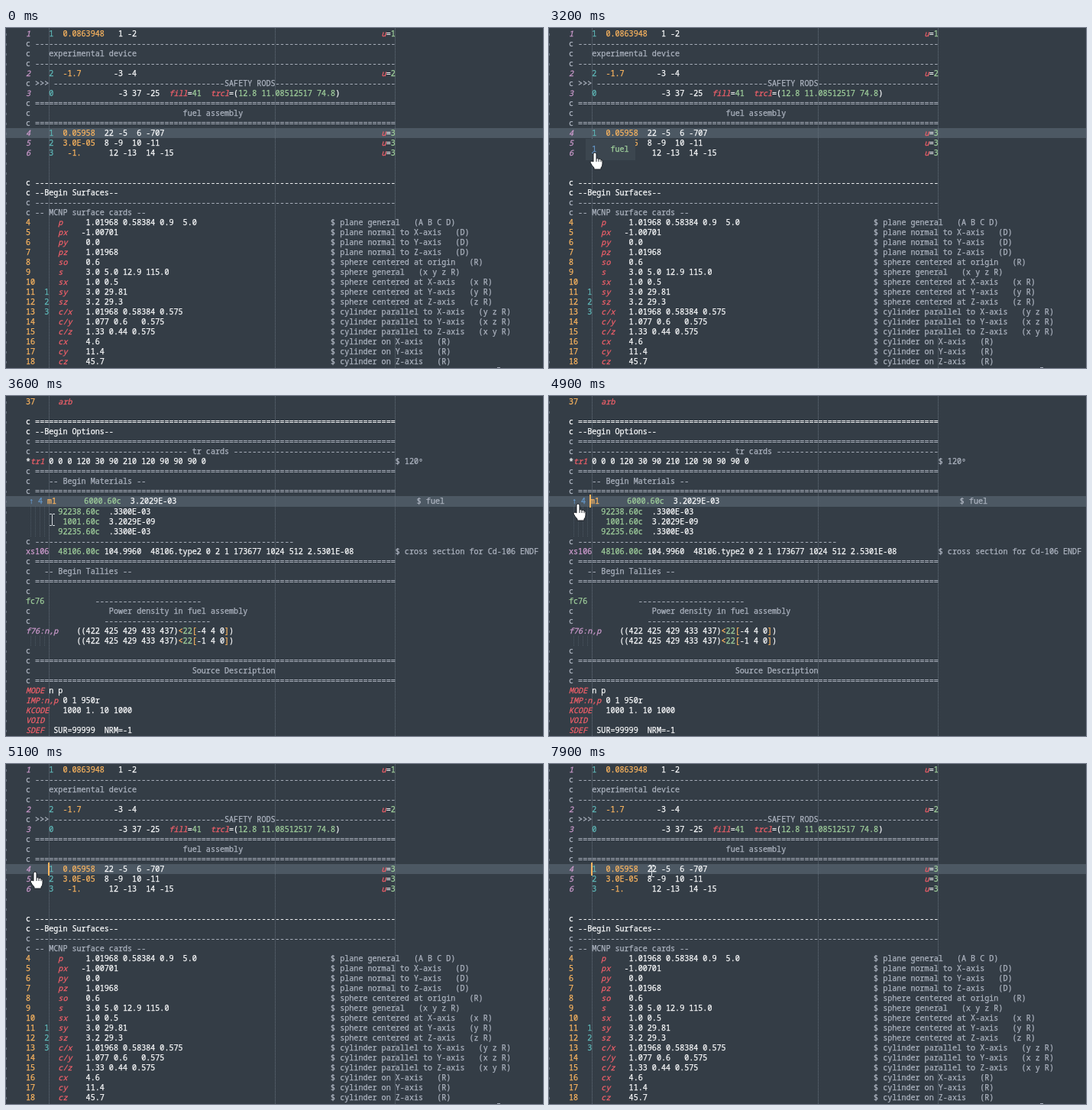
Animation of 703x445 px, one loop 8000 ms. Source, as an HTML page with a canvas:

```html
<!DOCTYPE html>
<html>
<head>
<meta charset="utf-8">
<style>
html, body { margin: 0; width: 100%; height: 100%; overflow: hidden; background: #343d46; }
canvas { display: block; }
</style>
</head>
<body>
<canvas id="stage" width="703" height="445"></canvas>
<script>
const ctx = document.getElementById('stage').getContext('2d');
const CHAR = 6.047, LEFT = 26, ROW = 13, TOP = 1, CURRENT = 10, LOOP = 8000, STEP = 100;
const FONT = '10.08px "Noto Sans Mono", "DejaVu Sans Mono", monospace';
const COLORS = {
  g: '#adb4c0', w: '#fbfcfd', o: '#fbb55f', t: '#5fb8b8', n: '#a0d09c',
  p: '#cf9ccf', r: '#f4606a', b: '#6699cc'
};

const line = (mark, style = 'g') => `0${style}c ${mark.repeat(78)}`;
const dash = line('-'), rule = line('=');
const universe = n => `|77Ru|78w=|79n${n}`;
const surface = (id, kind, values, note = '', ref = '') =>
  `0o${id}|4t${ref}|7R${kind}|${values[0] === '-' ? 12 : 13}w${values}|66g$ ${note}`;
const tally = n => `11w((422 425 429 433 437)|33o<|34n22|36o[|37w${n} 4 0|43o]|44w)`;

// A row is a list of "column, style, text"; an upper-case style is italic.
const cells = [
  '0P1|5t1|8o0.0863948|20w1 -2' + universe(1),
  dash,
  '0gc    experimental device',
  dash,
  '0P2|5t2|8o-1.7|19w-3 -4' + universe(2),
  `0gc >>> ${'-'.repeat(37)}SAFETY RODS${'-'.repeat(26)}`,
  '0P3|5t0|20w-3 37 -25|31Rfill|35w=|36n41|40Rtrcl|44w=(|46n12.8 11.08512517 74.8|67w)',
  rule,
  '0gc|34gfuel assembly',
  rule,
  '0P4|5t1|8o0.05958|17w22 -5  6 -707' + universe(3),
  '0P5|5t2|8o3.0E-05|17w8 -9  10 -11' + universe(3),
  '0P6|5t3|9o-1.|18w12 -13  14 -15' + universe(3),
  '', '',
  line('-', 'w'),
  '0wc --Begin Surfaces--',
  dash,
  '0gc -- MCNP surface cards --',
  surface(4, 'p', '1.01968 0.58384 0.9  5.0', 'plane general   (A B C D)'),
  surface(5, 'px', '-1.00701', 'plane normal to X-axis   (D)'),
  surface(6, 'py', '0.0', 'plane normal to Y-axis   (D)'),
  surface(7, 'pz', '1.01968', 'plane normal to Z-axis   (D)'),
  surface(8, 'so', '0.6', 'sphere centered at origin   (R)'),
  surface(9, 's', '3.0 5.0 12.9 115.0', 'sphere general   (x y z R)'),
  surface(10, 'sx', '1.0 0.5', 'sphere centered at X-axis   (x R)'),
  surface(11, 'sy', '3.0 29.81', 'sphere centered at Y-axis   (y R)', 1),
  surface(12, 'sz', '3.2 29.3', 'sphere centered at Z-axis   (z R)', 2),
  surface(13, 'c/x', '1.01968 0.58384 0.575', 'cylinder parallel to X-axis   (y z R)', 3),
  surface(14, 'c/y', '1.077 0.6   0.575', 'cylinder parallel to Y-axis   (x z R)'),
  surface(15, 'c/z', '1.33 0.44 0.575', 'cylinder parallel to Z-axis   (x y R)'),
  surface(16, 'cx', '4.6', 'cylinder on X-axis   (R)'),
  surface(17, 'cy', '11.4', 'cylinder on Y-axis   (R)'),
  surface(18, 'cz', '45.7', 'cylinder on Z-axis   (R)')
];

const options = [
  '0o37|7Rarb',
  '',
  line('=', 'w'),
  '0wc --Begin Options--',
  rule,
  `0gc ${'-'.repeat(33)} tr cards ${'-'.repeat(35)}`,
  '0w*|1Rtr1|5w0 0 0 120 30 90 210 120 90 90 90 0|80g$ 120º',
  rule,
  '0gc    -- Begin Materials --',
  rule,
  '0.66b↑ 4|4.63om1|12.63n6000.60c|22.63w3.2029E-03|84.63g$ fuel',
  '7n92238.60c|18w.3300E-03',
  '8n1001.60c|18w3.2029E-09',
  '7n92235.60c|18w.3300E-03',
  '0gc ' + '-'.repeat(56),
  '0pxs106|7n48106.00c|17w104.9960  48106.type2 0 2 1 173677 1024 512 2.5301E-08' +
    '|80g$ cross section for Cd-106 ENDF',
  rule,
  '0gc   -- Begin Tallies --',
  rule,
  '0gc',
  '0nfc76|15g' + '-'.repeat(23),
  '0gc|18gPower density in fuel assembly',
  '0gc|17g' + '-'.repeat(23),
  '0Pf76:n,p|' + tally(-4),
  tally(-1),
  '0gc',
  rule,
  '0gc|36gSource Description',
  rule,
  '0RMODE|5wn p',
  '0RIMP:n,p|8w0 1 950r',
  '0RKCODE|8w1000 1. 10 1000',
  '0RVOID',
  '0RSDEF|6wSUR=99999  NRM=-1'
];

// Pointer way points: time, x, y
const path = [
  [500, 12, 147], [800, 42, 140], [1000, 62, 136], [1200, 64, 139], [1300, 59, 140],
  [1400, 57, 140], [1600, 57, 140], [1700, 59, 138], [1800, 59, 136], [2600, 59, 136],
  [3200, 60, 163], [3500, 60, 163], [3600, 60, 162], [3800, 60, 162], [4600, 38, 141],
  [5500, 38, 141], [5900, 59, 138], [6000, 59, 138], [6400, 211, 179], [6700, 211, 179],
  [7200, 49, 130], [7600, 62, 133], [7900, 134, 140], [8000, 134, 140]
];
const hand = new Path2D('M-2 12V2a2 2 0 0 1 4 0V8q2-1 3 .5q2-.8 3 .7q2 0 2 2V15q0 3-2 5V22H-1V20Q-4 17-6 13q0-3 4-1Z');
const knuckles = new Path2D('M2 8v4M5 8.5v3.5M8 9.2v3');

function box(color, x, y, w, h) {
  ctx.fillStyle = color;
  ctx.fillRect(x, y, w, h);
}

// A hairline stroke gives the text its slightly heavy weight.
function write(col, style, text, baseline) {
  const key = style.toLowerCase();
  ctx.font = (style === key ? '' : 'italic ') + FONT;
  ctx.fillStyle = ctx.strokeStyle = COLORS[key];
  ctx.lineWidth = .25;
  [...text].forEach((ch, i) => {
    if (ch === ' ') return;
    const x = LEFT + (col + i) * CHAR;
    ctx.fillText(ch, x, baseline);
    ctx.strokeText(ch, x, baseline);
  });
}

function dotted(x, y, h, color) {
  ctx.strokeStyle = color;
  ctx.lineWidth = 1;
  ctx.setLineDash([1, 1]);
  ctx.beginPath();
  ctx.moveTo(x + .5, y);
  ctx.lineTo(x + .5, y + h);
  ctx.stroke();
  ctx.setLineDash([]);
}

function drawPage(rows) {
  // The inline link makes the current row of the options page one pixel taller.
  const extra = rows === options ? 1 : 0;
  const rowTop = i => TOP + i * ROW + (i > CURRENT ? extra : 0);
  box('#343d46', 0, 0, 703, 445);
  box('#4c5863', 0, rowTop(CURRENT), 703, ROW + extra);
  for (const x of [56, 352, 509]) dotted(x, 0, 445, '#65707b');
  rows.forEach((row, i) => {
    const y = rowTop(i);
    box('#66717c', 0, y + 6, 1, 3);
    for (const cell of row.split('|')) {
      const m = cell.match(/^([\d.]+)([a-zA-Z])(.*)$/);
      if (m) write(+m[1], m[2], m[3], y + 10);
    }
  });
  if (rows === cells) {
    box('#a7adba', 643, 444, 4, 1);
  } else {
    for (const [row, n] of [[11, 3], [24, 1]])
      for (let k = 1; k < 5; k++)
        dotted(Math.round(LEFT + k * CHAR), rowTop(row), n * ROW, '#4b5661');
  }
}

function drawPopup() {
  box('#3c464f', 48, 145, 65, 28);
  write(5, 'b', '1', 162);
  box(COLORS.b, 56, 163, 6, 1);
  write(9, 'n', 'fuel', 162);
}

function drawCaret(t, x) {
  const p = (t - 4800) % 1000;
  ctx.globalAlpha = p < 500 ? 1 : p < 600 || p >= 900 ? .5 : 0;
  box(COLORS.o, x, 129, 2, 17);
  ctx.globalAlpha = 1;
}

function drawPointer(t) {
  const i = path.findIndex(p => p[0] > t);
  const [t0, x0, y0] = path[i - 1], [t1, x1, y1] = path[i];
  const k = (t - t0) / (t1 - t0);
  const x = Math.round(x0 + (x1 - x0) * k), y = Math.round(y0 + (y1 - y0) * k);
  const onLink = t >= 2900 && t < 3600 || t >= 4300 && t < 5700;
  if (onLink) {
    ctx.save();
    ctx.translate(x, y);
    ctx.fillStyle = '#fff';
    ctx.strokeStyle = '#1c2126';
    ctx.lineWidth = 1;
    ctx.fill(hand);
    ctx.stroke(hand);
    ctx.stroke(knuckles);
    ctx.restore();
  } else {
    const c = '#d5dade';
    box(c, x, y - 7, 1, 14);
    for (const dy of [-8, 7]) {
      box(c, x - 3, y + dy, 3, 1);
      box(c, x + 1, y + dy, 3, 1);
    }
  }
}

function draw(t) {
  const inOptions = t >= 3500 && t < 5000;
  drawPage(inOptions ? options : cells);
  if (t >= 2200 && t < 3500) drawPopup();
  if (t >= 4900) drawCaret(t, inOptions ? 53 : 55);
  if (t >= 500) drawPointer(t);
}

const start = performance.now();
let last = -1;
function tick() {
  const t = Math.floor((performance.now() - start) % LOOP / STEP) * STEP;
  if (t !== last) draw(last = t);
  requestAnimationFrame(tick);
}
tick();
</script>
</body>
</html>
```
